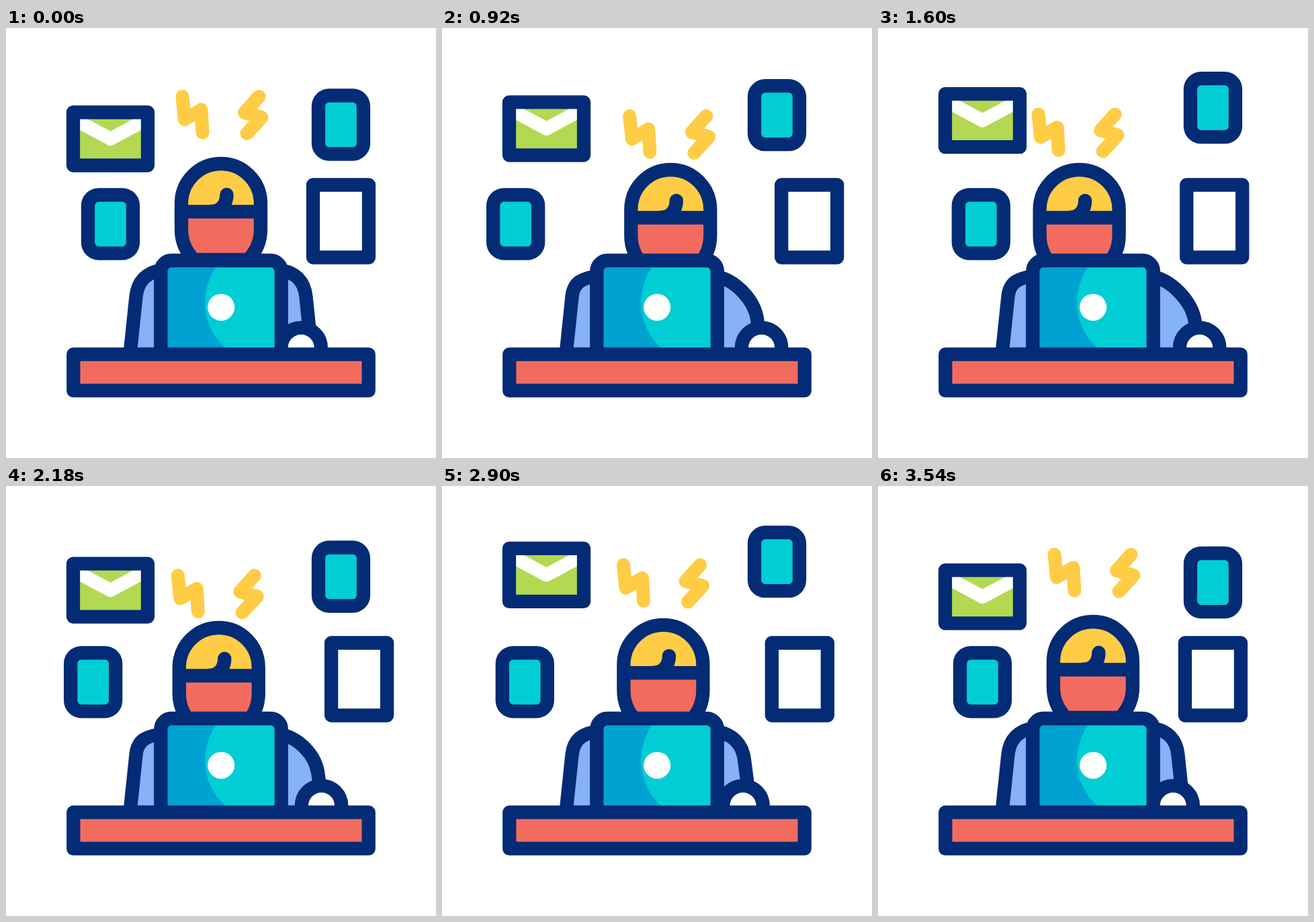
Write an HTML page that moves like this. It is 640x640 px and loops after 3600 ms.

```html
<!DOCTYPE html>
<html lang="en">
<head>
<meta charset="utf-8">
<title>Busy desk</title>
<style>
  html, body { margin: 0; width: 100%; height: 100%; overflow: hidden; background: #fff; }
  svg { display: block; width: 100vw; height: 100vh; }
  .ink { stroke: #042b75; stroke-width: 20.3; stroke-linejoin: round; }
  .bolt { fill: none; stroke: #ffcc45; stroke-width: 20; stroke-linecap: round; stroke-linejoin: round; }
  .teal { fill: #00ced4; }
  .red { fill: #f16c5e; }
  .sleeve { fill: #86b2f8; }
  .white { fill: #fff; }
  .line { fill: none; }
</style>
</head>
<body>
<svg viewBox="0 0 640 640">
  <defs>
    <clipPath id="flap"><rect x="100" y="125.5" width="111" height="79"/></clipPath>
  </defs>

  <g id="mail">
    <rect x="100" y="125.5" width="111" height="79" fill="#b2d951"/>
    <path d="M95 132.5L155.5 165L216 132.5" clip-path="url(#flap)" fill="none" stroke="#fff" stroke-width="20" stroke-linejoin="round"/>
    <rect class="ink line" x="100" y="125.5" width="111" height="79"/>
  </g>
  <rect id="phoneR" class="ink teal" x="465" y="100.5" width="67" height="87" rx="16"/>
  <rect id="phoneL" class="ink teal" x="122" y="248.3" width="67" height="87" rx="16"/>
  <rect id="sheet" class="ink white" x="457" y="233.5" width="83" height="108"/>

  <g id="bolts">
    <path class="bolt" d="M262.5 102L266 136L290.5 121.5L292.5 155.5"/>
    <path class="bolt" d="M376.5 102L355 126L380.5 133L358.5 157"/>
  </g>

  <path id="armL" class="ink sleeve"/>
  <path id="armR" class="ink sleeve"/>

  <g id="head">
    <path class="red" d="M261 273H379V300C379 320 370 335 360 345H280C270 335 261 320 261 300Z"/>
    <path fill="#ffcc45" d="M261 273V261A59 59 0 0 1 379 261V273Z"/>
    <path class="ink line" d="M264 273.3H376M328.5 248C328.5 262 320 273 305 273" stroke-linecap="round"/>
    <path class="ink line" d="M261 261A59 59 0 0 1 379 261V300C379 320 370 335 360 345H280C270 335 261 320 261 300Z"/>
  </g>

  <circle id="hand" class="ink white" cx="439.2" cy="475.8" r="29.7"/>

  <rect x="230" y="346" width="180" height="140" rx="16" fill="#00a2d1"/>
  <path class="teal" d="M312 356C290 390 288 440 326 476V486H410V350H316Z"/>
  <path class="ink line" d="M230.3 486V362A16 16 0 0 1 246 346H394A16 16 0 0 1 409.8 362V486"/>
  <circle class="white" cx="320.2" cy="415.7" r="20"/>

  <rect class="ink red" x="100.3" y="485.7" width="439.4" height="54"/>
</svg>
<script>
const LOOP = 3600;
const TURN = 2 * Math.PI;

const clamp = (v, lo = 0, hi = 1) => Math.min(hi, Math.max(lo, v));
const mix = (a, b, k) => a + (b - a) * k;
const span = (t, from, to) => clamp((t - from) / (to - from));
const ease = (t, from, to) => (1 - Math.cos(Math.PI * span(t, from, to))) / 2;

// 0 to 1 and back once per period, resting after the given number of cycles.
const wave = (t, period, cycles) => (1 - Math.cos(TURN * Math.min(t / period, cycles))) / 2;

const el = id => document.getElementById(id);
const move = (id, x, y) => el(id).setAttribute("transform", `translate(${x.toFixed(2)} ${y.toFixed(2)})`);

function drawArms(drop, k) {
  const top = 360 + drop, bend = Math.pow(k, 1.3);
  el("armL").setAttribute("d",
    `M236 ${top}C208 ${top + 2} 195.5 379 193.5 400L184.5 486H236Z`);
  el("armR").setAttribute("d",
    `M404 ${top}C${mix(432, 436, k)} ${top + 2 + 2 * k} ` +
    `${mix(444.5, 468, bend)} ${mix(379, 407, k)} ${mix(446.5, 472, bend)} ${mix(400, 438, k)}` +
    `L${mix(455.5, 477, k)} 486H404Z`);
}

function draw(t) {
  const slide = wave(t, 1720, 2);
  move("sheet", 48.8 * slide, 0);
  move("phoneL", -46.4 * slide, 0);
  move("phoneR", 0, -33 * wave(t, 1195, 3));

  const sag = 3 * Math.sin(Math.PI * span(t, 0, 3555));
  move("mail", 0, -mix(sag, 33.5, wave(t, 1185, 3)));

  // The worker ducks, sways right-left-right, then sits back up.
  const duck = ease(t, 200, 600) - ease(t, 2700, 3120);
  const sway = 20.3 * duck * clamp(1.5 * Math.cos(TURN * (t - 920) / 1720), -1, 1);
  const bob = 29 - 3.1 * Math.sin(TURN * (t - 920) / 2000);
  move("head", sway, 9 * duck);
  move("bolts", sway - 3.5 * duck, bob * duck);

  const reach = ease(t, 200, 1080) - Math.pow(span(t, 1600, 3140), 1.5);
  move("hand", 39.5 * reach, 0);
  drawArms(9 * duck, reach);
}

const start = performance.now();
function tick() {
  draw((performance.now() - start) % LOOP);
  requestAnimationFrame(tick);
}
tick();
</script>
</body>
</html>
```
